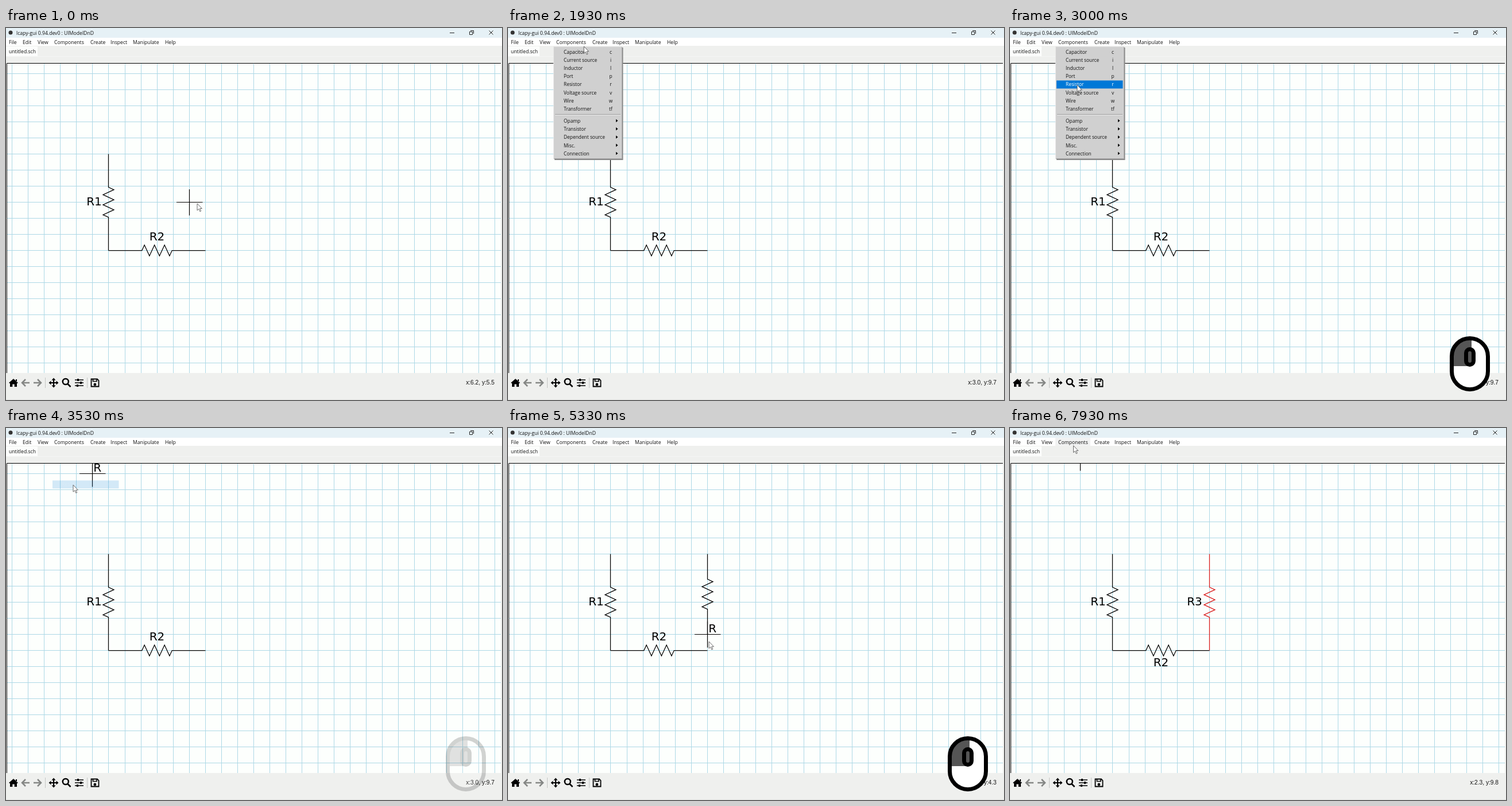
Animation, 864 px wide and 648 px high, one loop 8 s. Source, as an HTML page with a canvas:

```html
<!DOCTYPE html>
<html lang="en">
<head>
<meta charset="utf-8">
<title>Schematic editor</title>
<style>
html, body { margin: 0; height: 100%; overflow: hidden; background: #eff0ee; }
canvas { display: block; }
</style>
</head>
<body>
<canvas id="stage" width="864" height="648"></canvas>
<script>
const ctx = document.getElementById('stage').getContext('2d');
const LOOP = 8000, STEP = 1000 / 15;
const UI = '"Open Sans", sans-serif', LABEL = '"DejaVu Sans", sans-serif', STATUS = '"Liberation Sans", sans-serif';

// Pointer path: time, x, y and whether the stretch leading there is linear.
const PATH = [
  [0, 333.5, 305], [390, 333.5, 305], [1200, 134, 26], [1800, 134, 26], [2600, 117.5, 98.5],
  [3580, 117.5, 98.5], [4070, 293, 192], [4200, 347, 226, true], [4590, 347, 226],
  [5535, 351, 390.6], [6140, 351, 390.6], [6600, 210, 414], [7290, 210, 414], [7930, 111, 30], [8000, 111, 30]
];
// Mouse badge, in steps: first visible, first gone.
const PRESSES = [[19, 26], [40, 54], [68, 90]];
const MENU_OPEN = 1395, MENU_CLOSE = 3260, DRAG_START = 4530, DRAG_END = 5660;

const BAR = [['File', 5], ['Edit', 29], ['View', 55], ['Components', 84], ['Create', 147],
  ['Inspect', 182], ['Manipulate', 221], ['Help', 277]];
const PARTS = [['Capacitor', 'c'], ['Current source', 'i'], ['Inductor', 'l'], ['Port', 'p'],
  ['Resistor', 'r'], ['Voltage source', 'v'], ['Wire', 'w'], ['Transformer', 'tf']];
const GROUPS = ['Opamp', 'Transistor', 'Dependent source', 'Misc.', 'Connection'];
const ROW = 14.23;

// Grid lines run through pixel centres.
const gridX = i => Math.round(11.3 + 28.03 * i) - .5;
const gridY = j => 79.5 + 28 * j;
const snap = ([x, y]) => [gridX(Math.round((x - 11.3) / 28.03)), gridY(Math.round((y - 80) / 28))];

function pointerAt(t) {
  const n = PATH.findIndex(p => p[0] > t);
  const [t0, x0, y0] = PATH[n - 1], [t1, x1, y1, linear] = PATH[n];
  const f = (t - t0) / (t1 - t0), e = linear ? f : f * f * (3 - 2 * f);
  return [x0 + (x1 - x0) * e, y0 + (y1 - y0) * e];
}

function box(color, x, y, w, h) {
  ctx.fillStyle = color;
  ctx.fillRect(x, y, w, h);
}
function text(s, x, y, size, font = UI, color = '#111', align = 'left') {
  ctx.font = `${size}px ${font}`;
  ctx.fillStyle = color;
  ctx.textAlign = align;
  ctx.fillText(s, x, y);
}
function stroke(d, color = '#000', width = 1) {
  ctx.strokeStyle = color;
  ctx.lineWidth = width;
  ctx.stroke(new Path2D(d));
}
function fill(d, color = '#000') {
  ctx.fillStyle = color;
  ctx.fill(new Path2D(d), 'evenodd');
}
function at(x, y, draw) {
  ctx.save();
  ctx.translate(x, y);
  draw();
  ctx.restore();
}

function drawWindow(hover) {
  box('#eff0ee', 0, 0, 864, 648);
  box('#e6f1f6', 0, 0, 864, 17);
  box('#fff', 0, 17, 864, 14);
  if (hover) box('#f1f2f2', 79, 17, 61, 14);
  box('#fcfdfc', 0, 32, 55, 17);
  box('#f5f6f5', 0, 49, 864, 1);
  box('#e2e4e2', 0, 647, 864, 1);
  ctx.fillStyle = '#333';
  ctx.beginPath();
  ctx.arc(8, 8, 3.5, 0, 7);
  ctx.fill();
  text('lcapy-gui 0.94.dev0 : UIModelDnD', 18, 12, 8.65);
  for (const [s, x] of BAR) text(s, x, 27.6, 8.65);
  text('untitled.sch', 5, 44.4, 8.65);
  stroke('M773 8.5h8M807.5 6.5h5v5h-5zM809 4.5h5.5v5.5M841.5 4.5l7 7m0-7l-7 7', '#222');
}

function drawToolbar() {
  at(13, 618, () => fill('M0-7L8 0L6.5 1L6 .7V7H1.7V2.5H-1.7V7H-6V.7L-6.5 1L-8 0ZM4-6H6V-1L4-3Z'));
  for (const [x, side] of [[34, 1], [55, -1]]) at(x, 618, () => {
    ctx.scale(side, 1);
    stroke('M7 0H-5M0-6L-6 0L0 6', '#858785', 2.5);
  });
  stroke('M68.5 609V627M141.5 609V627', '#c4c6c4');
  at(83, 618, () => {
    stroke('M-6 0H6M0-6V6', '#000', 2.2);
    fill('M0-8.5L3.5-4.5H-3.5ZM0 8.5L3.5 4.5H-3.5ZM-8.5 0L-4.5-3.5V3.5ZM8.5 0L4.5-3.5V3.5Z');
  });
  at(105, 618, () => stroke('M3.8-2A5 5 0 1 1-6.2-2A5 5 0 1 1 3.8-2M2.5 2L7.5 7', '#000', 2.5));
  at(127.5, 618, () => {
    stroke('M-7.5-5H7.5M-7.5 0H7.5M-7.5 5H7.5', '#000', 1.5);
    stroke('M-2-7V-3M3-2V2M-3 3V7', '#000', 3);
  });
  at(155, 618, () => {
    stroke('M-6.5-6.5H4L6.5-4V6.5H-6.5Z', '#000', 1.8);
    stroke('M-3.5-6V-2.5H3V-6', '#000', 1.6);
    fill('M-2.5 3A2.4 2.4 0 1 1 2.3 3A2.4 2.4 0 1 1-2.5 3');
  });
}

function drawGrid() {
  box('#fdfffd', 1, 61, 861, 540);
  let d = '';
  for (let i = 0; i < 31; i++) d += `M${gridX(i)} 62V601`;
  for (let j = 0; j < 19; j++) d += `M1 ${gridY(j)}H862`;
  stroke(d, '#add8e6');
  stroke('M862 61.5H1.5V601');
}

function drawResistor(x, y, length, angle, color = '#000') {
  if (length <= 0) return;
  const body = Math.min(52.5, length), start = (length - body) / 2;
  let d = `M0 0H${start}`;
  for (let i = 0; i < 6; i++) d += `L${start + body * (i + .5) / 6} ${i % 2 ? 9.5 : -9.5}`;
  d += `L${start + body} 0H${length}`;
  at(x, y, () => {
    ctx.rotate(angle);
    stroke(d, color, 1.25);
  });
}
const label = (s, x, y) => text(s, x, y, 20, LABEL, '#000', 'center');

function drawCircuit(t, [cx, cy]) {
  const down = Math.PI / 2, placed = t >= DRAG_END;
  const left = gridX(6), right = gridX(12), top = gridY(5), bottom = gridY(11);
  drawResistor(left, top, bottom - top, down);
  drawResistor(left, bottom, right - left, 0);
  label('R1', 153.5, 309);
  label('R2', 263, placed ? 415 : 370);
  if (placed) {
    drawResistor(right, top, bottom - top, down, '#d81818');
    label('R3', 321.5, 309);
  } else if (t >= DRAG_START) drawResistor(right, top, cy - top, down);

  if (placed && t < 6190) return;
  stroke(`M${cx - 22.5} ${cy}h45.5M${cx} ${cy - 22.5}v45.5`, '#000', 1.2);
  if (t > 3320 && !placed) text('R', cx + 1.8, cy - 3.5, 20, LABEL, '#000');
}

function drawItem(row, selected) {
  const y = 41.5 + ROW * row, color = selected ? '#fff' : '#111', [name, key] = PARTS[row];
  if (selected) box('#0078d7', 81, y - 7, 115.5, 14);
  text(name, 97, y + 3, 8.4, UI, color);
  text(key, 179, y + 3, 8.4, UI, color, 'center');
}

function drawMenu(y) {
  box('#8a8a8a', 81, 34, 119.5, 196);
  box('#e4e4e4', 79, 32, 120, 196);
  box('#a8a8a8', 80, 33, 119, 195);
  box('#d0d0d0', 80, 33, 118, 194);
  const active = y > 34 ? Math.round((y - 41.5) / ROW) : -1;
  PARTS.forEach((_, row) => drawItem(row, row === active));
  box('#999', 82, 150, 114, 1);
  box('#eee', 82, 151, 114, 1);
  GROUPS.forEach((name, i) => {
    const y = 162 + ROW * i;
    text(name, 97, y + 3, 8.4);
    fill(`M188 ${y - 3.2}l3.5 2.7l-3.5 2.7z`);
  });
}

// Drawn once and opaque, so that it fades as a single layer.
function makeBadge() {
  const badge = document.createElement('canvas'), pen = badge.getContext('2d');
  const shape = (x, y, w, h, r) => {
    pen.beginPath();
    pen.roundRect(x, y, w, h, r);
  };
  badge.width = 70;
  badge.height = 96;
  pen.save();
  shape(3.5, 3.5, 63, 89, 31.5);
  pen.clip();
  pen.fillStyle = '#fff';
  pen.fillRect(0, 0, 70, 96);
  pen.fillStyle = '#555';
  pen.fillRect(0, 0, 38, 52);
  pen.restore();
  pen.lineWidth = 7;
  shape(3.5, 3.5, 63, 89, 31.5);
  pen.stroke();
  shape(28.5, 22.5, 13, 27, 6.5);
  pen.stroke();
  return badge;
}
const badge = makeBadge();

function drawPointer([x, y]) {
  at(x - .5, y + .7, () => {
    const d = 'M0 0V12L2.8 9.5L4.8 14L6.7 13.2L4.7 8.8H8.4Z';
    fill(d, '#fff');
    stroke(d, '#444', .8);
  });
}

function render(step) {
  const t = step * STEP + .01, pointer = pointerAt(t), y = pointer[1];
  const menuOpen = t >= MENU_OPEN && t < MENU_CLOSE;
  const outside = y < 66 || (t > 1200 && t < 3600);
  // Outside the drawing area the last position inside it stays on show.
  const spot = !outside ? pointer : t < 5000 ? [152, 69] : [113, 63];

  drawWindow(y < 32 && !menuOpen);
  drawGrid();
  ctx.save();
  ctx.beginPath();
  ctx.rect(1, 61, 861, 540);
  ctx.clip();
  drawCircuit(t, snap(spot));
  ctx.restore();
  drawToolbar();
  const ux = 6 + (spot[0] - 319.75) / 56.1, uy = 5.5 + (304 - spot[1]) / 56;
  text(`x:${ux.toFixed(1)}, y:${uy.toFixed(1)}`, 851, 621.3, 10.2, STATUS, '#111', 'right');

  if (menuOpen) drawMenu(y);
  const fade = 1 - (t - 3250) / 340;
  if (t >= MENU_CLOSE && fade > 0) {
    ctx.globalAlpha = fade;
    drawItem(4, true);
    ctx.globalAlpha = 1;
  }
  const level = Math.max(0, ...PRESSES.map(([a, b]) => Math.min(6, step - a + 1, b - step)));
  ctx.globalAlpha = level / 6;
  ctx.drawImage(badge, 766, 537);
  ctx.globalAlpha = 1;
  drawPointer(pointer);
}

function tick() {
  render(Math.floor((performance.now() % LOOP + 4) / STEP) % 120);
  requestAnimationFrame(tick);
}
tick();
</script>
</body>
</html>
```
